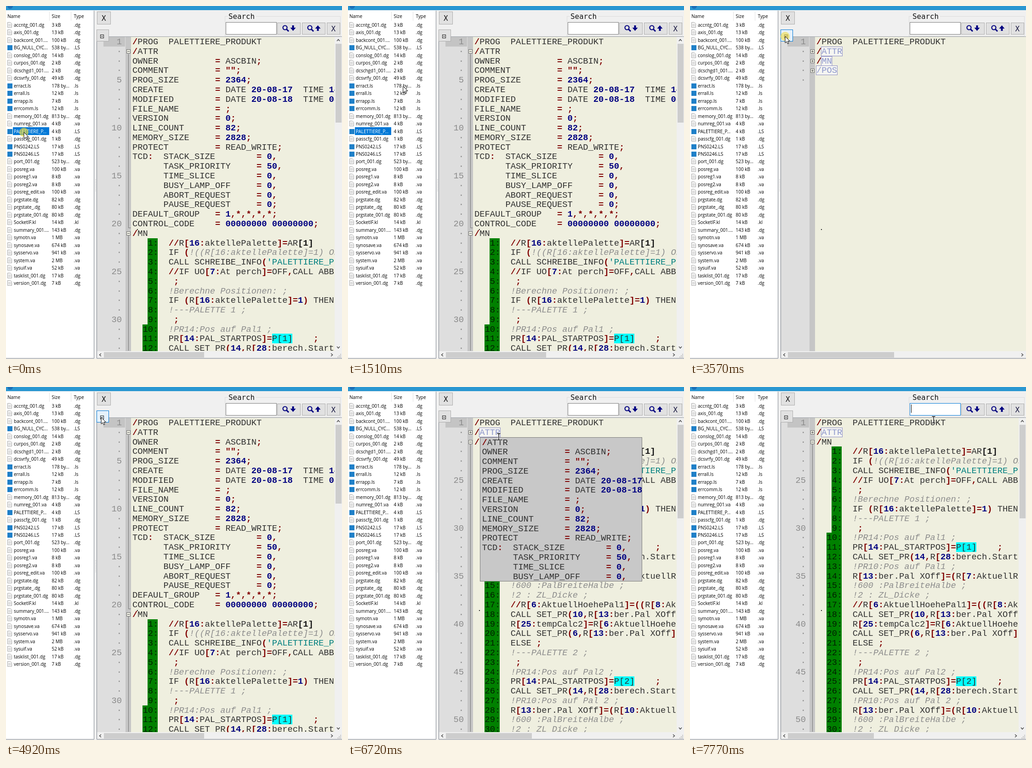
Recreate the animation shown at these times as an HTML page. Size 731 by 766 pixels, loop 8 s.

```html
<!DOCTYPE html>
<html lang="en">
<head>
<meta charset="utf-8">
<title>Program viewer</title>
<style>
html, body { margin: 0; width: 100%; height: 100%; overflow: hidden; background: #f0f0f0; }
svg { display: block; width: 731px; height: 766px; }
.ui { font: 10px "Open Sans", "Noto Sans", sans-serif; fill: #000; }
.mono { font: 15.8px "DejaVu Sans Mono", monospace; fill: #111; }
.code { font: 18.75px "Liberation Mono", "Courier New", monospace; fill: #303030; }
.num { font-weight: bold; fill: #000080; }
.op { font-weight: bold; fill: #800000; }
.dark { font-weight: bold; fill: #111; }
.str { fill: #008080; }
.com { font-style: italic; fill: #8c8c8c; }
.ln { fill: #8a8a8a; text-anchor: end; }
.step { fill: #002000; }
.fold { fill: #8e98cc; }
</style>
</head>
<body>
<svg id="stage" viewBox="0 0 731 766" xmlns="http://www.w3.org/2000/svg"></svg>
<script>
const LOOP = 8000, CH = 11.25, LH = 20.79, X0 = 275, BASE = 83;
const BLUE = '#0078d7', NAVY = '#000080';

// ---- markup helpers
const esc = s => s.replace(/&/g, '&amp;').replace(/</g, '&lt;');
const rect = (x, y, w, h, fill, more = '') =>
  `<rect x="${x}" y="${y}" width="${w}" height="${h}" fill="${fill}" ${more}/>`;
const frame = (x, y, w, h, fill, line, more = '') =>
  rect(x + .5, y + .5, w - 1, h - 1, fill, `stroke="${line}" ${more}`);
const path = (d, line, more = '') => `<path d="${d}" fill="none" stroke="${line}" ${more}/>`;
const text = (x, y, s, cls, more = '') => `<text x="${x}" y="${y}" class="${cls}" ${more}>${esc(s)}</text>`;
const group = (id, body, more = '') => `<g id="${id}" ${more}>${body}</g>`;
// Fills the cells between two x positions of the row with baseline y, on whole pixels
const cells = (xa, xb, y, fill) => {
  const [x, top, right, bottom] = [xa, y - 16, xb, y - 16 + LH].map(Math.round);
  return rect(x, top, right - x, bottom - top, fill);
};

// ---- program text
const field = (key, value) => key.padEnd(16) + '= ' + value;
const task = (key, value, lead = '') => (lead.padEnd(6) + key).padEnd(24) + '= ' + value;
const title = '/PROG  PALETTIERE_PRODUKT';
const attr = [
  '/ATTR',
  field('OWNER', 'ASCBIN;'),
  field('COMMENT', '"";'),
  field('PROG_SIZE', '2364;'),
  field('CREATE', 'DATE 20-08-17  TIME 14:'),
  field('MODIFIED', 'DATE 20-08-18  TIME 08:'),
  field('FILE_NAME', ';'),
  field('VERSION', '0;'),
  field('LINE_COUNT', '82;'),
  field('MEMORY_SIZE', '2828;'),
  field('PROTECT', 'READ_WRITE;'),
  task('STACK_SIZE', '0,', 'TCD:'),
  task('TASK_PRIORITY', '50,'),
  task('TIME_SLICE', '0,'),
  task('BUSY_LAMP_OFF', '0,'),
  task('ABORT_REQUEST', '0,'),
  task('PAUSE_REQUEST', '0;'),
  field('DEFAULT_GROUP', '1,*,*,*,*;'),
  field('CONTROL_CODE', '00000000 00000000;')
];
const steps = `//R[16:aktellePalette]=AR[1]    ;
IF (!((R[16:aktellePalette]=1) OR
CALL SCHREIBE_INFO('PALETTIERE_PRO
//IF UO[7:At perch]=OFF,CALL ABBRU
 ;
!Berechne Positionen: ;
IF (R[16:aktellePalette]=1) THEN ;
!---PALETTE 1 ;
 ;
!PR14:Pos auf Pal1 ;
PR[14:PAL_STARTPOS]=P[1]    ;
CALL SET_PR(14,R[28:berech.StartP
!PR10:Pos auf Pal1 ;
R[13:ber.Pal XOff]=(R[7:AktuellR
!600 :PalBreiteHalbe ;
!2 : ZL_Dicke ;
//R[6:AktuellHoehePal1]=((R[8:Ak
CALL SET_PR(10,R[13:ber.Pal XOff
R[25:tempCalc2]=R[6:AktuellHoehe
CALL SET_PR(6,R[13:ber.Pal XOff]
ELSE ;
!---PALETTE 2 ;
 ;
!PR14:Pos auf Pal2 ;
PR[14:PAL_STARTPOS]=P[2]    ;
CALL SET_PR(14,R[28:berech.Start
!PR10:Pos auf Pal 2 ;
R[13:ber.Pal XOff]=(R[10:Aktuell
!600 :PalBreiteHalbe ;
!2 : ZL_Dicke ;`.split('\n');

const TOKEN = /\bP\[\d\]|(?<=AR)\[1\]|'[^']*'?|!.*|\d[\d-]*|[A-Za-z_][\w.]*|[^\w\s]/g;
function kind(tok) {
  if (/^P\[/.test(tok)) return 'mark';
  if (tok === '[1]') return 'dark';
  if (tok[0] === "'") return 'str';
  if (tok[0] === '!') return 'com';
  if (/^\d/.test(tok)) return 'num';
  return /^\w/.test(tok) ? 'id' : 'op';
}
function codeLine(src, x, y) {
  let back = '', spans = '';
  for (const m of src.matchAll(TOKEN)) {
    const px = x + m.index * CH, k = kind(m[0]);
    if (k === 'mark') back += cells(px, px + m[0].length * CH - 1, y, '#00ffff');
    spans += `<tspan x="${px}" class="${k}">${esc(m[0])}</tspan>`;
  }
  return back + `<text y="${y}" class="code">${spans}</text>`;
}

// ---- editor views
const mid = row => Math.round(99 + (row - 1) * LH);
const foldBox = (row, plus) => frame(262, mid(row) - 5, 9, 9, '#efefe4', '#707070') +
  path(`M264 ${mid(row) - .5}h5` + (plus ? `M266.5 ${mid(row) - 3}v5` : ''), '#505050');
const foldLine = (from, to, tick) =>
  path(`M266.5 ${from}V${to}` + (tick ? 'h5' : ''), '#767676');

function view(id, rows, folds) {
  let lines = '', gutter = '';
  rows.forEach((r, i) => {
    const y = BASE + i * LH;
    const shown = r.no === 1 || r.no % 5 === 0;
    gutter += text(252, y, shown ? String(r.no) : '·', 'code ln');
    if (r.step) {
      const x = X0 + (r.step < 10 ? 3 : 2) * CH;
      lines += cells(x - .5, 330, y, '#008000') + text(x, y, r.step + ':', 'code step');
    }
    if (r.box) {
      const x = X0 + r.src.length * CH;
      lines += frame(Math.round(x) - 1, Math.round(y) - 16, r.box.length * CH + 2, 21, '#f5f5f2', '#8f8fc4') +
        text(x, y, r.box, 'code fold');
    }
    lines += codeLine(r.src, X0 + (r.step ? 7 * CH : 0), y);
  });
  return group(id, group('', gutter + folds, 'clip-path="url(#wide)"') +
    group('', lines, 'clip-path="url(#page)"'));
}
const first = { no: 1, src: title };
const main = { no: 21, src: '/MN' };
const body = n => steps.slice(0, n).map((src, i) => ({ no: 22 + i, src, step: i + 1 }));
const closed = { no: 2, src: '/', box: 'ATTR' };

const views =
  view('full', [first, ...attr.map((src, i) => ({ no: i + 2, src })), main, ...body(12)],
    foldLine(104, 481.5, true) + foldLine(498, 748) + foldBox(1) + foldBox(20)) +
  view('part', [first, closed, main, ...body(30)],
    foldLine(124, 748) + foldBox(1, true) + foldBox(2)) +
  view('none', [first, closed, { no: 21, src: '/', box: 'MN' }, { no: 104, src: '', box: '/POS' }, { no: 106, src: '' }],
    [1, 2, 3].map(r => foldBox(r, true)).join(''));

// ---- file list
const files = `accntg_001.dg,3 kB
axis_001.dg,13 kB
backcont_001....,100 kB,.dg
BG_NULL_CYC...,538 by...,.LS
conslog_001.dg,14 kB
curpos_001.dg,2 kB
dcschgd1_001....,2 kB,.dg
dcsvrfy_001.dg,49 kB
erract.ls,178 by...
errall.ls,12 kB
errapp.ls,7 kB
errcomm.ls,12 kB
memory_001.dg,813 by...
numreg_001.va,4 kB
PALETTIERE_P...,4 kB,.LS
passcfg_001.dg,1 kB
PNS0242.LS,17 kB
PNS0246.LS,17 kB
port_001.dg,523 by...
posreg.va,100 kB
posreg1.va,8 kB
posreg2.va,8 kB
posreg_edit.va,100 kB
prgstate.dg,82 kB
prgstate_.dg,80 kB
prgstate_001.dg,80 kB
SocketIF.kl,14 kB
summary_001....,143 kB,.dg
symotn.va,1 MB
synosave.va,674 kB
sysservo.va,941 kB
system.va,2 MB
sysuif.va,52 kB
tasklist_001.dg,17 kB
version_001.dg,7 kB`.split('\n').map(l => l.split(','));

const sheet = y => `<path d="M3.5 ${y - 5.5}h6l3 3v8h-9z" fill="#fafafa" stroke="#a5a5a5"/>` +
  path(`M5 ${y - 1.5}h6M5 ${y + .5}h6M5 ${y + 2.5}h6`, '#b8b8b8', 'stroke-width=".8"');
const list = files.map(([name, size, type = name.slice(name.lastIndexOf('.'))], i) => {
  const y = Math.round(41 + i * 16.47);
  return (/ls/i.test(type) ? rect(3, y - 5, 11, 11, '#1f80c8') : sheet(y)) +
    text(17, y + 4, name, 'ui') + text(99.5, y + 4, size, 'ui') + text(147.5, y + 4, type, 'ui');
}).join('');

const leftPane = rect(0, 10, 191, 755, '#fff') +
  text(3, 26, 'Name', 'ui') + text(99.5, 26, 'Size', 'ui') + text(147.5, 26, 'Type', 'ui') +
  path('M94.5 12v20M141.5 12v20', '#e2e2e2') + list +
  group('selected', rect(15, 263, 79, 17, BLUE) + text(17, 276, 'PALETTIERE_P...', 'ui', 'style="fill:#fff"')) +
  path('M191.5 10V764.5H0', '#828790') +
  path('M195 376v26', '#a0a0a0', 'stroke-dasharray="1 2.5"');

// ---- toolbar
const button = (x, y, w, h) => frame(x, y, w, h, '#e1e1e1', '#adadad');
const lens = (x, dir) => `<circle cx="${x}" cy="47" r="4.5" fill="none" stroke="${NAVY}" stroke-width="2.2"/>` +
  path(`M${x + 3.5} 50.5l4.5 4.5`, NAVY, 'stroke-width="3"') +
  `<path transform="translate(${x + 17.5} 48) scale(1 ${dir})" d="M-2-6h4v5h4l-6 7l-6-7h4z" fill="${NAVY}"/>`;
const toolbar = button(198, 12, 30, 28) + text(208, 32, 'X', 'mono') +
  frame(476, 22, 252, 44, 'none', '#dcdcdc') + rect(482, 16, 62, 12, '#f0f0f0') +
  text(484, 28, 'Search', 'mono') +
  frame(478, 35, 111, 27, '#fff', '#7a7a7a', 'id="query"') +
  group('queryCaret', rect(481, 38, 1, 18, '#000')) +
  button(590, 36, 51, 26) + lens(607, 1) + button(644, 36, 51, 26) + lens(661, -1) +
  button(698, 36, 29, 26) + text(707.5, 55, 'X', 'mono', 'style="fill:#15153f"');

// ---- editor shell
const arrow = (x, y, turn) => path('M-3 2L0-1.5L3 2', '#505050', `stroke-width="1.6" transform="translate(${x} ${y}) rotate(${turn})"`);
const shell = rect(198, 66, 533, 683, '#efefdf') + rect(198, 66, 62, 683, '#dedede') +
  rect(212, 67, 47, 21, '#c4c4c4') + rect(260, 66, 12, 683, '#c6c6c6');
const bars = rect(198, 749, 533, 15, '#f0f0f0') + arrow(205, 757, -90) +
  rect(213, 751, 218, 12, '#cdcdcd', 'id="hThumb"') +
  group('hEnd', arrow(0, 757, 90)) +
  group('vBar', rect(715, 67, 16, 682, '#f0f0f0') + arrow(723, 74, 0) + arrow(723, 741, 180) +
    rect(717, 82, 13, 171, '#cdcdcd', 'id="vThumb"') +
    path('M728 755v8M725 758v5M722 761v2', '#b0b0b0', 'stroke-width="2" stroke-dasharray="1.5 1.5"')) +
  group('seam', path('M715.5 67V748', '#8c8c8c')) +
  path('M198 66.5H731', '#a0a4aa') + path('M197.5 66V764.5H731', '#828790');

const foldAll = frame(197, 51, 27, 26, '#e1e1e1', '#adadad', 'id="foldAll"') +
  frame(205, 62, 8, 8, 'none', '#222') + path('M207 66h4', '#222') +
  group('plus', path('M209 64v4', '#222'));

const hint = path('M14 281H139V266', '#c4c4c4', 'stroke-width="2"') +
  frame(12, 264, 126, 17, '#fff', '#767676') +
  text(17, 276, 'PALETTIERE_PRODUKT.LS', 'ui', 'style="fill:#62526e"');
const peek = frame(287, 109, 353, 313, '#c8c8c8', '#7c7c7c') +
  group('', attr.slice(0, 15).map((src, i) => codeLine(src, 291.5, 125.5 + i * LH)).join(''), 'clip-path="url(#peekBox)"');

const pointer = group('pointer',
  group('arrow', '<path d="M0 0V14.2L3.3 11.2L5.4 16L7.8 15L5.7 10.2H10.2z" fill="#fff" stroke="#000"/>') +
  group('beam', [['#fff', 3], ['#000', 1.3]].map(([color, width]) =>
    path('M-3.5-7H-1L0-6L1-7H3.5M0-6V6M-3.5 7H-1L0 6L1 7H3.5', color, `stroke-width="${width}"`)).join('')));

const stage = document.getElementById('stage');
stage.innerHTML = `<defs>
  <clipPath id="page"><rect id="pageBox" x="272" y="67" width="443" height="682"/></clipPath>
  <clipPath id="wide"><rect x="198" y="67" width="533" height="682"/></clipPath>
  <clipPath id="peekBox"><rect x="288" y="110" width="351" height="311"/></clipPath></defs>` +
  rect(0, 0, 731, 766, '#f0f0f0') + rect(0, 0, 731, 9, '#2a97d1') +
  '<circle cx="9" cy="0" r="6" fill="#1b6fb8"/>' +
  leftPane + toolbar + shell + views + group('caret', rect(274, 68, 1, 20, '#000')) + bars + foldAll +
  rect(285, 484, 2, 2, '#222') +
  group('peek', peek) + group('hint', hint) +
  '<circle id="halo" r="10" opacity=".62"/>' + pointer;

const el = {};
stage.querySelectorAll('[id]').forEach(n => { if (n.id) el[n.id] = n; });
const show = (id, on) => el[id].setAttribute('visibility', on ? 'visible' : 'hidden');
const set = (id, name, v) => el[id].setAttribute(name, v);

// ---- timing
const track = [ // time, x, y
  [0, 39, 274], [1170, 39, 274], [1870, 207, 66], [4900, 207, 66], [5730, 264, 98],
  [6660, 264, 98], [6720, 328, 108], [7460, 530, 51], [7600, 530, 51], [7770, 530, 71]
];
const clicks = [ // from, to, colour
  [0, 40, '#f2dc30'], [2290, 2680, '#f7cc30'], [3570, 3990, '#f0dc48'],
  [5760, 5960, '#ffab30'], [7500, 7620, '#f7cc30']
];
const within = (t, a, b) => t >= a && t < b;
const ease = u => u * u * (3 - 2 * u);

function position(t) {
  const i = track.findIndex(k => k[0] > t);
  if (i < 0) return track[track.length - 1].slice(1);
  const [ta, xa, ya] = track[i - 1], [tb, xb, yb] = track[i];
  const u = ease((t - ta) / (tb - ta));
  return [xa + (xb - xa) * u, ya + (yb - ya) * u];
}

function render(t) {
  const [x, y] = position(t);
  const inQuery = x > 478 && x < 589 && y > 35 && y < 62;
  const overFold = x > 197 && x < 224 && y > 51 && y < 77;
  const beam = inQuery || (x > 272 && y > 67);
  const click = clicks.find(c => within(t, c[0], c[1]));

  set('pointer', 'transform', `translate(${x.toFixed(2)} ${y.toFixed(2)})`);
  show('arrow', !beam);
  show('beam', beam);
  show('halo', click);
  if (click) {
    set('halo', 'cx', x);
    set('halo', 'cy', y);
    set('halo', 'fill', click[2]);
  }

  show('selected', t < 2290);
  set('hint', 'opacity', t < 1240 ? Math.min(1, Math.max(0, (t - 580) / 210)) : 0);

  const allClosed = within(t, 2430, 3680), attrClosed = t >= 5870;
  const wide = within(t, 2390, 3680);
  show('full', !allClosed && !attrClosed);
  show('none', allClosed);
  show('part', attrClosed);
  show('plus', allClosed);
  show('vBar', !wide);
  show('seam', wide && !allClosed);
  set('pageBox', 'width', wide ? 458 : 443);
  set('vThumb', 'height', t >= 5830 ? 203 : 171);
  set('hThumb', 'width', allClosed ? 231 : wide ? 225 : attrClosed ? 187 : 218);
  set('hEnd', 'transform', `translate(${wide ? 723 : 709} 0)`);

  set('foldAll', 'fill', overFold ? '#e5f1fb' : '#e1e1e1');
  set('foldAll', 'stroke', overFold ? BLUE : '#adadad');
  show('caret', within(t, 5930, 6430) || within(t, 6930, 7430));
  show('peek', within(t, 6700, 6950));
  const focused = t >= 7500;
  set('query', 'stroke', focused ? BLUE : inQuery ? '#171717' : '#7a7a7a');
  show('queryCaret', focused);
}

const start = performance.now();
(function tick() {
  render((performance.now() - start) % LOOP);
  requestAnimationFrame(tick);
})();
</script>
</body>
</html>
```
